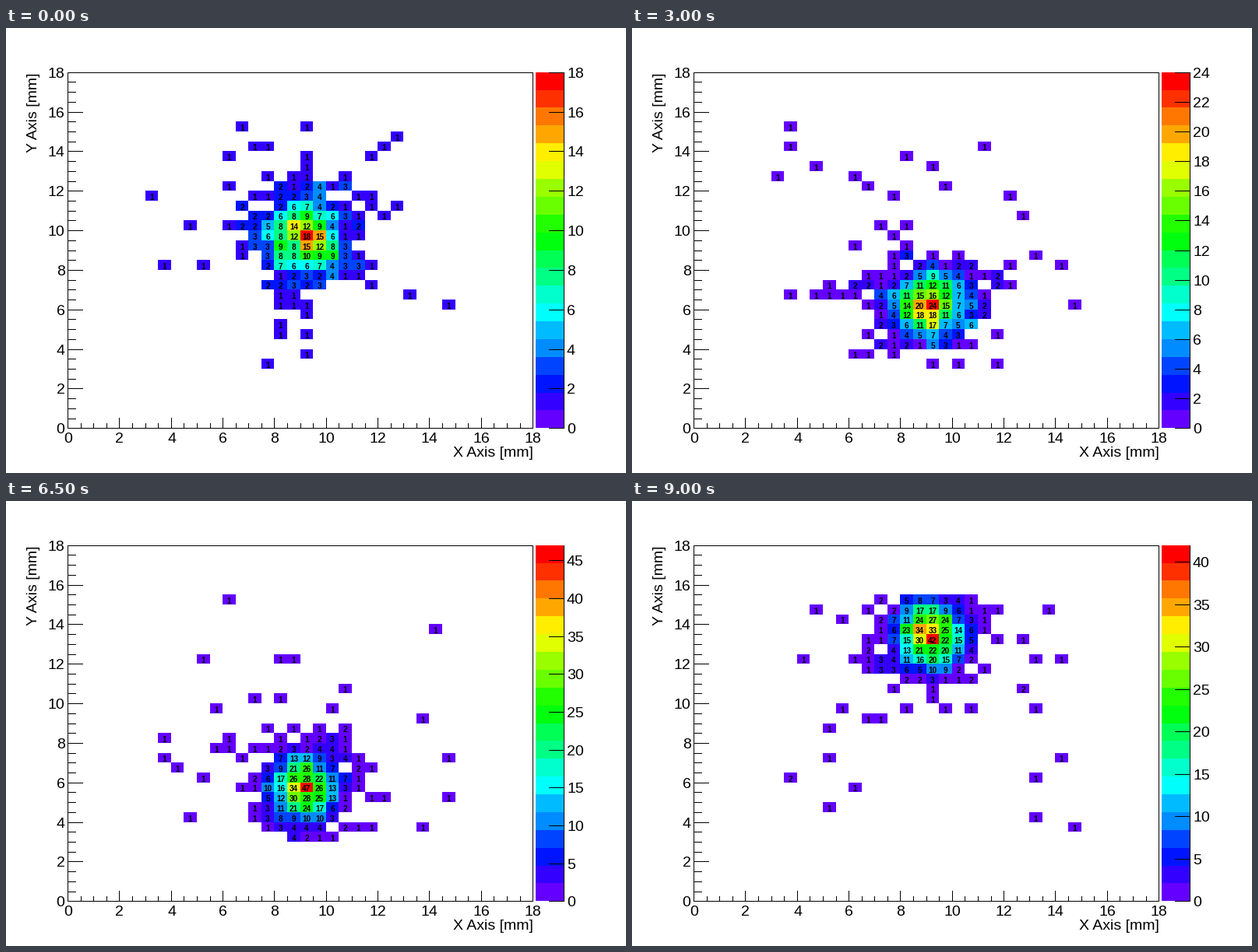
Animation of 796x572 px, one loop 9500 ms. Source, as a matplotlib script:

```python
import colorsys
import math

import matplotlib.pyplot as plt
import numpy as np
from matplotlib.animation import FuncAnimation
from matplotlib.patches import Rectangle

W, H, DPI = 796, 572, 100
FRAMES, INTERVAL = 19, 500
LEFT, RIGHT, TOP, BOTTOM = 79.6, 676.6, 57.2, 514.8
BAR_L, BAR_R = 680, 716
SPAN, BINS, LEVELS = 18, 36, 20
BEAM_X = 9.15

# Highest count per step; it sets the colour scale.
PEAKS = [18, 17, 24, 22, 21, 20, 24, 16, 17, 34, 27, 33, 36, 47, 33, 18,
         41, 36, 42]

plt.rcParams["font.family"] = "Liberation Sans"
fig = plt.figure(figsize=(W / DPI, H / DPI), dpi=DPI, facecolor="white")
ax = fig.add_axes([0, 0, 1, 1])
ax.set_xlim(0, W)
ax.set_ylim(H, 0)
ax.axis("off")


def px(mm):
    return math.floor(LEFT + mm * (RIGHT - LEFT) / SPAN + 1e-6)


def py(value, top=SPAN):
    return math.floor(BOTTOM - value * (BOTTOM - TOP) / top + 1e-6)


def box(x0, y0, x1, y1, color="black", z=2):
    return ax.add_patch(Rectangle((x0, y0), x1 - x0, y1 - y0, facecolor=color,
                                  lw=0, antialiased=False, zorder=z))


def hline(x0, x1, y):
    return box(x0, y, x1 + 1, y + 1, z=3)


def vline(x, y0, y1):
    return box(x, y0, x + 1, y1 + 1, z=3)


def label(x, y, s, size=19.5, **kw):
    return ax.text(x, y, s, fontsize=size * 72 / DPI, va="baseline",
                   zorder=4, **kw)


def rainbow(level):
    """Hue runs from violet (280 degrees) to red in 50 steps."""
    step = int((level + 0.99) * 50 / LEVELS)
    return colorsys.hls_to_rgb((280 - (step + 1) * 5.6) / 360, 0.5, 1)


COLORS = [rainbow(k) for k in range(LEVELS)]


def beam(i):
    """Height, widths and core gain: slow sweep down, fast down, then up."""
    if i < 9:
        return 9.65 - 0.57 * i, 0.86, 1.2 - 0.04 * i, 0.78
    if i < 15:
        return 9.75 - (i - 9), 0.7, 0.95, 0.85
    return 10.3 + 1.05 * (i - 15), 0.75, 1.0, 0.85


def counts(i):
    rng = np.random.default_rng(40 + i)
    cy, sx, sy, gain = beam(i)
    peak = PEAKS[i]
    mid = (np.arange(BINS) + 0.5) * SPAN / BINS
    dx, dy = np.meshgrid(mid - BEAM_X, mid - cy)
    core = gain * peak * np.exp(-((dx / sx) ** 2 + (dy / sy) ** 2) / 2)
    halo = 0.6 * np.exp(-(dx ** 2 + dy ** 2) / 7)
    mean = core + halo + 0.04
    hits = rng.poisson(mean)
    calm = np.rint(mean + 0.6 * (hits - mean)).astype(int)
    hits = np.where(mean > 3, calm, hits).clip(0, peak - 1)
    hits[np.unravel_index(mean.argmax(), mean.shape)] = peak
    # Only the sensor area records hits.
    seen = np.zeros_like(hits)
    seen[6:31, 6:30] = hits[6:31, 6:30]
    return seen


def draw_axes():
    x0, x1, y0, y1 = int(LEFT), int(RIGHT), int(TOP), int(BOTTOM)
    for y in (y0, y1):
        hline(x0, x1, y)
    for x in (x0, x1):
        vline(x, y0, y1)
    for k in range(BINS + 1):
        mm = k / 2
        major = k % 4 == 0
        x, y = px(mm), py(mm)
        vline(x, y1 - (13 if major else 6), y1)
        hline(x0, x0 + (19 if major else 10), y)
        if major:
            label(x + 0.5, 533, f"{mm:.0f}", ha="center")
            label(75.5, y + 7, f"{mm:.0f}", ha="right")
    label(677, 551, "X Axis [mm]", ha="right")
    label(40.5, 57, "Y Axis [mm]", ha="right", rotation=90,
          rotation_mode="anchor")

    for k, color in enumerate(COLORS):
        box(BAR_L, py(k + 1, LEVELS), BAR_R, py(k, LEVELS), color)
    vline(BAR_R, y0, y1)


live = []


def draw(i):
    while live:
        live.pop().remove()
    peak = PEAKS[i]
    grid = counts(i)
    for row, col in zip(*np.nonzero(grid)):
        n = grid[row, col]
        level = min(int(0.01 + n * LEVELS / peak), LEVELS - 1)
        a, b = px(col / 2), px((col + 1) / 2)
        top, low = py((row + 1) / 2), py(row / 2)
        live.append(box(a, top, b, low, COLORS[level]))
        live.append(label((a + b) / 2, low - 1, str(n), 10, ha="center",
                          weight="bold"))
    for v in range(0, peak + 1, 2 if peak < 25 else 5):
        y = py(v, peak)
        live.append(hline(BAR_R - 19, BAR_R, y))
        live.append(label(720, y + 7, str(v), ha="left"))
    return live


draw_axes()
anim = FuncAnimation(fig, draw, frames=FRAMES, interval=INTERVAL,
                     init_func=lambda: draw(0), repeat=True, repeat_delay=0,
                     blit=False)
plt.show()
```
